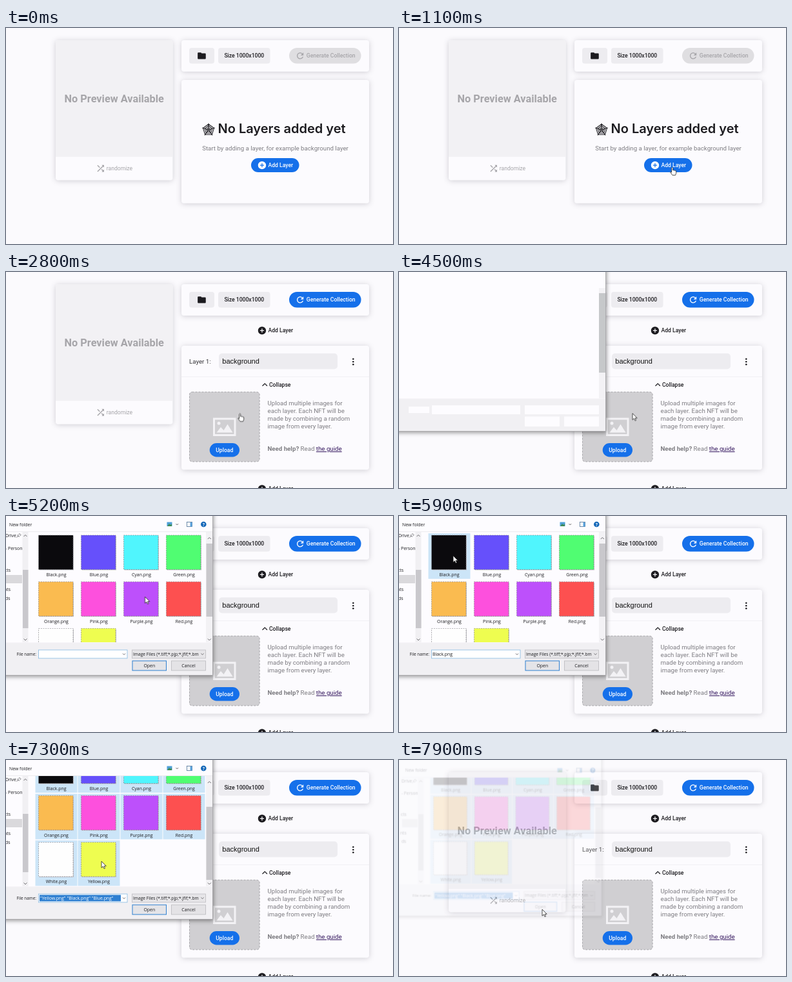
These frames come from a looping animation (600x337 px, 8 s). An HTML page:

```html
<!DOCTYPE html>
<html lang="en">
<head>
<meta charset="utf-8">
<title>Layer upload</title>
<style>
html, body { margin: 0; width: 100%; height: 100%; overflow: hidden; background: #fbfafd; }
svg { display: block; width: 100vw; height: 100vh; }
text { font: 9.7px Roboto, sans-serif; white-space: pre; }
.btn { font-size: 8.6px; font-weight: 500; }
.card { fill: #fcfbfe; filter: drop-shadow(0 1.5px 4px rgba(30, 25, 45, .2)); }
.grey { fill: #edecf0; }
.blue { fill: #1570ea; }
.white { fill: #fff; }
.ink { fill: #1c1b1f; }
.soft { fill: #7e7d82; }
.off { fill: #a6a5a9; }
.win text { font: 6.9px "Open Sans", sans-serif; fill: #1d1d20; }
.mid { text-anchor: middle; }
.line { fill: none; stroke: #6d6c70; stroke-width: 1; }
#dialog { transform-origin: 135px 100px; }
#frame { filter: drop-shadow(1px 2px 3px rgba(0, 0, 0, .4)); }
</style>
</head>
<body>
<svg viewBox="0 0 600 337" preserveAspectRatio="none">
  <defs>
    <path id="folder" d="M10 4H4c-1.1 0-2 .9-2 2v12c0 1.1.9 2 2 2h16c1.1 0 2-.9 2-2V8c0-1.1-.9-2-2-2h-8l-2-2z"/>
    <path id="refresh" d="M17.65 6.35C16.2 4.9 14.21 4 12 4c-4.42 0-8 3.58-8 8s3.58 8 8 8c3.73 0 6.84-2.55 7.73-6h-2.08c-.82 2.33-3.04 4-5.65 4-3.31 0-6-2.69-6-6s2.69-6 6-6c1.66 0 3.14.69 4.22 1.78L13 11h7V4z"/>
    <path id="plus" d="M12 2a10 10 0 1 0 0 20a10 10 0 1 0 0-20zm5 11h-4v4h-2v-4H7v-2h4V7h2v4h4z"/>
    <path id="shuffle" d="M10.6 9.2L5.4 4 4 5.4l5.2 5.2zM14.5 4l2 2L4 18.6 5.4 20 18 7.5l2 2V4zm.3 9.4l-1.4 1.4 3.1 3.1-2 2.1H20v-5.5l-2 2z"/>
    <clipPath id="listClip"><path d="M36 25H310V197H36z"/></clipPath>
  </defs>

  <rect width="600" height="337" fill="#fbfafd"/>

  <rect class="card" x="77" y="19" width="181.5" height="218.5" rx="4"/>
  <path d="M77 201V23q0-4 4-4H254.500q4 0 4 4V201z" fill="#f2f1f4"/>
  <text class="off mid" x="167.700" y="115.500" style="font-size:16.3px;font-weight:700">No Preview Available</text>
  <use href="#shuffle" class="off" transform="translate(138.800 211.200) scale(.66)"/>
  <text class="btn off" x="155.800" y="222" style="font-weight:400">randomize</text>

  <rect class="card" x="272" y="19" width="291" height="49" rx="4"/>
  <rect class="grey" x="284" y="31" width="39" height="24.500" rx="4"/>
  <use href="#folder" class="ink" transform="translate(295.900 35.800) scale(.63)"/>
  <rect class="grey" x="329" y="31" width="80.500" height="24.500" rx="4"/>
  <text class="btn ink mid" x="369.300" y="46.300">Size 1000x1000</text>

  <g id="empty">
    <rect x="439" y="31" width="111.500" height="24.500" rx="12.200" fill="#dfdee1"/>
    <g class="off">
      <use href="#refresh" transform="translate(448.400 35.700) scale(.64)"/>
      <text class="btn" x="465.800" y="46.300">Generate Collection</text>
    </g>
    <rect class="card" x="272" y="81" width="291" height="192.500" rx="4"/>
    <path id="web" fill="none" stroke="#222126" stroke-width="1.100"/>
    <text class="ink" x="328.500" y="164" style="font:600 20px Inter,sans-serif">No Layers added yet</text>
    <text class="soft mid" x="417.500" y="191">Start by adding a layer, for example background layer</text>
    <rect class="blue" x="380" y="203" width="74.500" height="22" rx="11"/>
    <use href="#plus" class="white" transform="translate(389.500 206.700) scale(.62)"/>
    <text class="btn white" x="406.500" y="217.200">Add Layer</text>
  </g>

  <g id="layer">
    <rect class="blue" x="439" y="31" width="111.500" height="24.500" rx="12.200"/>
    <use href="#refresh" class="white" transform="translate(448.400 35.700) scale(.64)"/>
    <text class="btn white" x="465.800" y="46.300">Generate Collection</text>
    <g id="add" class="ink">
      <use href="#plus" transform="translate(389.500 83.900) scale(.62)"/>
      <text class="btn" x="406.500" y="94.300">Add Layer</text>
    </g>
    <use href="#add" y="247"/>
    <rect class="card" x="272" y="115" width="291" height="193.500" rx="4"/>
    <text x="284" y="142.700" fill="#37363a">Layer 1:</text>
    <rect class="grey" x="330" y="127" width="184" height="24.500" rx="5"/>
    <text x="335.300" y="142.800" fill="#111" style="font:11px 'Liberation Sans',Arial,sans-serif">background</text>
    <g class="ink"><circle cx="538.300" cy="135.800" r="1.300"/><circle cx="538.300" cy="140" r="1.300"/><circle cx="538.300" cy="144.200" r="1.300"/></g>
    <path d="M272 163.500H563" stroke="#f1f0f4"/>
    <path d="M397.500 177.800l3.700-3.700 3.700 3.700" fill="none" stroke="#222126" stroke-width="1.300"/>
    <text class="btn ink" x="408" y="178.700">Collapse</text>
    <rect x="284.500" y="187.300" width="108.500" height="108.500" rx="4" fill="#e8e7ea" stroke="#c9c8cc" stroke-dasharray="3 2"/>
    <rect id="hover" x="284.500" y="187.300" width="108.500" height="108.500" rx="4" fill="#d0cfd2" stroke="#adacb0" stroke-dasharray="3 2"/>
    <g fill="#f7f6f9" opacity=".9">
      <path d="M321 227.500H356.500V256H321zM324 230.500V253H353.500V230.500z" fill-rule="evenodd"/>
      <path d="M326.500 250.500l6.500-8.500 4.500 5 6-9.500 8 13z"/><circle cx="330" cy="236" r="2.500"/>
    </g>
    <rect class="blue" x="315.700" y="267" width="46.300" height="21.500" rx="10.700"/>
    <text class="btn white mid" x="338.800" y="280.700">Upload</text>
    <g id="help" class="soft"></g>
    <text class="soft" x="405.500" y="279"><tspan font-weight="700">Need help?</tspan> Read <tspan fill="#35185f" text-decoration="underline">the guide</tspan></text>
  </g>

  <g id="dialog" class="win">
    <g id="frame">
      <rect x="-30" y="-30" width="350.500" height="278.500" fill="#fdfcff" stroke="#98979b" stroke-width=".7"/>
    </g>
    <path d="M-30 197.500H320V248H-30z" fill="#f1f0f3"/>
    <path d="M310 25H320V197H310z" fill="#f3f2f5"/>
    <g id="blank" fill="#fdfcff">
      <path d="M310 33H320V157H310z" fill="#c6c8ca"/>
      <path d="M15 210H47V220H15zM51 208H188V222H51zM195 208H310V222H195zM195 225.500H249V241H195zM256 225.500H310V241H256z"/>
    </g>
    <g id="content">
      <text x="5" y="15.500">New folder</text>
      <g>
        <rect x="249.500" y="9.500" width="8" height="6.500" fill="#4fa0d8"/><path d="M250 16l3-4 2 2 2-2v4z" fill="#3f8a55"/>
        <path d="M263.500 12l1.800 2 1.800-2" class="line"/>
        <rect x="280.500" y="9.500" width="8" height="7" fill="#fff" stroke="#4a6f96" stroke-width=".8"/><path d="M285.500 10h3v6.500h-3z" fill="#5ba3dd"/>
        <circle cx="306.300" cy="13" r="4.300" fill="#1467b8"/>
        <text class="mid" x="306.300" y="15.600" style="fill:#fff;font-weight:700">?</text>
      </g>
      <path d="M0 24.500H320" stroke="#ecebef"/>
      <path d="M0 92H25V105H0z" fill="#dad9dc"/>
      <text x="-1" y="33">Drive</text>
      <path d="M16.500 33.500l2.500-2.500m-1.500-1.500l3 3m-1.500-3l2-2 2 2-2 2" class="line"/>
      <text x="-1" y="52.500">- Person</text>
      <text x="-2" y="87">cts</text>
      <text x="-3" y="116.500">nts</text>
      <text x="-1" y="130.500">ds</text>
      <path d="M25.500 25H34.500V197H25.500z" fill="#f1f0f3"/>
      <path d="M26 84H34.500V175H26z" fill="#c9c8cc"/>
      <path d="M27.500 32l2.500-2.500 2.500 2.500M27.500 191.500l2.500 2.500 2.500-2.500" class="line"/>
      <g clip-path="url(#listClip)"><g id="list"></g></g>
      <path id="thumb" d="M310.500 43H320V157H310.500z" fill="#c9c8cc"/>
      <path d="M312.800 36l2.500-2.500 2.500 2.500M312.800 191.500l2.500 2.500 2.500-2.500" class="line"/>
      <text x="47" y="217.900" text-anchor="end" style="font-size:6.400px">File name:</text>
      <rect x="50.500" y="209" width="137.500" height="13" fill="#fff" stroke="#86b9e2" stroke-width=".8"/>
      <text id="one" x="52" y="218">Black.png</text>
      <g id="many">
        <path d="M52 210.500H178V220.500H52z" fill="#2f80d2"/>
        <text x="53" y="218" style="fill:#fff">"Yellow.png" "Black.png" "Blue.png"</text>
      </g>
      <path d="M181 214.500l2 2 2-2" class="line"/>
      <rect x="195.500" y="209" width="114" height="13" fill="#e6e5e8" stroke="#bdbcc0" stroke-width=".8"/>
      <text x="197" y="218" style="font-size:6.650px">Image Files (*.tiff;*.pjp;*.jfif;*.bm</text>
      <path d="M302.500 214.500l2 2 2-2" class="line"/>
      <rect x="196" y="226" width="52.500" height="15" fill="#e4e4e8" stroke="#2d7fd0"/>
      <text class="mid" x="222.300" y="236">Open</text>
      <rect x="256.500" y="226" width="53" height="15" fill="#e4e3e6" stroke="#bab9bd" stroke-width=".8"/>
      <text class="mid" x="283" y="236">Cancel</text>
    </g>
  </g>

  <g id="cursor">
    <path id="arrow" d="M0 0V10.200L2.400 8 4 11.500 5.600 10.800 4.100 7.400H7.200z" fill="#fff" stroke="#222" stroke-width=".8"/>
    <path id="hand" d="M.6 1.200Q1.600-.6 2.700 1.200V5q1.200-.9 1.800.3 1.200-.7 1.700.4 1.500-.5 1.500 1V9.500L6.500 12.700H2L-1.400 8q0-1.500 2 .2z" fill="#fff" stroke="#222" stroke-width=".8"/>
    <path id="beam" d="M-2-5.500Q0-5.500 0-4.300Q0-5.500 2-5.500M0-4.500V4.500M-2 5.500Q0 5.500 0 4.300Q0 5.500 2 5.500" fill="none" stroke="#222" stroke-width="1"/>
  </g>
</svg>
<script>
const LOOP = 8000;
const $ = id => document.getElementById(id);

function add(parent, tag, attrs, label) {
  const el = document.createElementNS('http://www.w3.org/2000/svg', tag);
  for (const k in attrs) el.setAttribute(k, attrs[k]);
  if (label) el.textContent = label;
  return parent.appendChild(el);
}

// Rows are [ms, props, easing]; the picture advances in 100 ms ticks.
function play(el, rows) {
  const at = t => Math.max(0, t / LOOP - 1e-4);
  const frames = rows.map(([t, props, easing = 'steps(1)']) => ({ offset: at(t), easing, ...props }));
  if (frames[0].offset > 0) frames.unshift({ ...frames[0], offset: 0, easing: 'steps(1)' });
  frames.push({ ...frames[frames.length - 1], offset: 1 });
  el.animate(frames, { duration: LOOP, iterations: Infinity, easing: `steps(${LOOP / 100})` });
}

// Visible during each [from, to) span.
function show(el, ...spans) {
  const rows = [[0, { opacity: 0 }]];
  for (const [from, to] of spans) {
    if (from === 0) rows.pop();
    rows.push([from, { opacity: 1 }]);
    if (to < LOOP) rows.push([to, { opacity: 0 }]);
  }
  play(el, rows);
}

const shift = (x, y) => ({ transform: `translate(${x}px, ${y}px)` });

// Spider web
const corner = (r, i) => {
  const a = i * Math.PI * .4 - Math.PI / 2;
  return `${314 + r * Math.cos(a)} ${159 + r * Math.sin(a)}`;
};
const five = [0, 1, 2, 3, 4];
$('web').setAttribute('d',
  [9, 6.2, 3.4].map(r => 'M' + five.map(i => corner(r, i)).join('L') + 'z').join('') +
  five.map(i => `M314 159L${corner(10.3, i)}`).join(''));

['Upload multiple images for', 'each layer. Each NFT will be', 'made by combining a random', 'image from every layer.']
  .forEach((line, i) => add($('help'), 'text', { x: 405.5, y: 208.2 + i * 11.8 }, line));

// File tiles
const files = {
  Black: '#0b0a0d', Blue: '#6650fb', Cyan: '#50f5fd', Green: '#50fd72', Orange: '#fabb50',
  Pink: '#fd50dd', Purple: '#bd50fb', Red: '#fd5050', White: '#fefefe', Yellow: '#eefd50'
};
Object.entries(files).forEach(([name, fill], i) => {
  const x = 50.5 + i % 4 * 66, y = 30 + Math.floor(i / 4) * 72.7;
  const box = { x: x - 5, y: y - 3, width: 65, height: 71 };
  const list = $('list');
  if (name === 'Yellow') show(add(list, 'rect', { ...box, fill: '#e3f0fa' }), [6500, 7300]);
  show(add(list, 'rect', { ...box, fill: '#cce5f8' }), [name === 'Black' ? 5900 : 7300, LOOP]);
  add(list, 'rect', { x: x + 1, y: y + 1, width: 53.5, height: 53.5, fill: '#c4c3c8' });
  add(list, 'rect', { x, y, width: 53.5, height: 53.5, fill, stroke: '#77767c', 'stroke-width': .6, 'stroke-dasharray': '2 1.5' });
  add(list, 'text', { x: x + 27.5, y: y + 64, class: 'mid' }, name + '.png');
});

show($('empty'), [0, 1400]);
show($('layer'), [1400, LOOP]);
show($('hover'), [2500, LOOP]);
show($('blank'), [4300, 4800]);
show($('content'), [4800, LOOP]);
show($('one'), [5900, 7300]);
show($('many'), [7300, LOOP]);

const pose = (opacity, scale) => ({ opacity, transform: `scale(${scale})` });
play($('dialog'), [
  [0, pose(0, .95)], [4300, pose(.35, .965)], [4400, pose(.8, .99)], [4500, pose(1, 1)], [7900, pose(.2, .965)]
]);
play($('list'), [[0, shift(0, 0)], [6900, shift(0, 0), 'linear'], [7100, shift(0, -47)]]);
play($('thumb'), [[0, shift(0, 0)], [6900, shift(0, 0), 'linear'], [7100, shift(0, 30)]]);

show($('arrow'), [500, 900], [4000, LOOP]);
show($('hand'), [900, 1400], [2500, 4000]);
show($('beam'), [1400, 2500]);
play($('cursor'), [
  [0, 550, 298], [500, 550, 298], [1100, 422, 217], [1400, 422, 221.5], [2200, 422, 221.5], [2700, 361, 220.5],
  [4500, 362, 220.5], [5100, 215.5, 126], [5200, 215.5, 126], [5800, 84, 62], [6100, 84, 62],
  [6600, 153, 176.5], [7000, 153, 176.5], [7200, 148, 158], [7300, 148, 158], [7700, 222, 233]
].map(([t, x, y]) => [t, shift(x, y), 'ease-in-out']));
</script>
</body>
</html>
```
